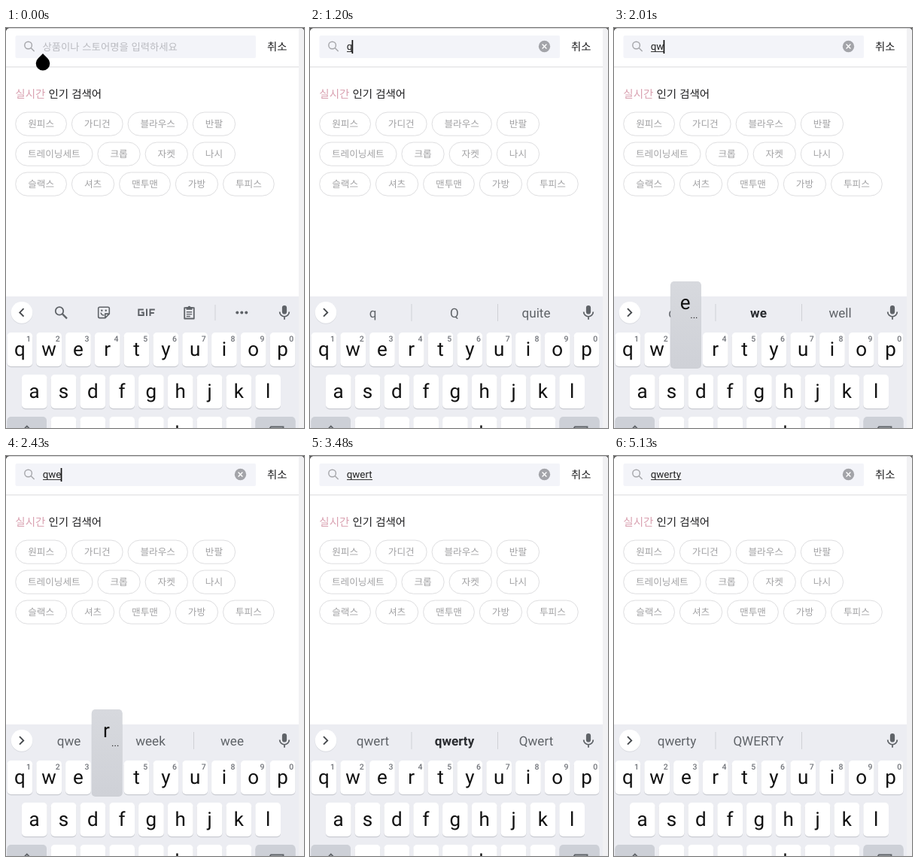
These frames come from a looping animation (396x532 px, 5580 ms). An HTML page:

```html
<!DOCTYPE html>
<html lang="ko">
<head>
<meta charset="utf-8">
<title>Search input</title>
<style>
  html, body { margin: 0; width: 100%; height: 100%; overflow: hidden; background: #fff; }
  svg { display: block; width: 396px; height: 532px; text-rendering: geometricPrecision; }
  text { font-family: Roboto, sans-serif; }
  .ko { font-family: "Noto Sans CJK KR", "Noto Sans CJK", sans-serif; }
  .mid { text-anchor: middle; }
  .key { font-size: 26px; fill: #111; text-anchor: middle; }
  .hint { font-size: 10.5px; font-weight: 500; fill: #707379; text-anchor: middle; }
  .word { font-size: 17.1px; fill: #5f6368; text-anchor: middle; }
  .line { fill: none; stroke: #5f6368; stroke-width: 1.8; }
</style>
</head>
<body>
<svg id="stage" viewBox="0 0 396 532">
  <defs>
    <linearGradient id="popFill" x2="0" y2="1">
      <stop offset="0" stop-color="#d7d9de"/>
      <stop offset="1" stop-color="#cfd1d7"/>
    </linearGradient>
  </defs>
  <rect width="396" height="532" fill="#fff"/>

  <rect x="12.5" y="10" width="319.5" height="30" rx="2" fill="#f3f4f9"/>
  <g fill="none" stroke="#a5a6aa" stroke-width="1.4">
    <circle cx="29.6" cy="23" r="4.8"/>
    <path d="M33.2 26.6l4.4 4.4"/>
  </g>
  <text id="placeholder" class="ko" x="48.5" y="29.5" font-size="13.35" fill="#babbc0">상품이나 스토어명을 입력하세요</text>
  <text id="typed" x="48.7" y="29.3" font-size="13.4" fill="#222"></text>
  <rect id="underline" x="49" y="31" height="1" fill="#333"/>
  <rect id="caret" y="16" width="1.7" height="18" fill="#111"/>
  <g id="clear">
    <circle cx="311.5" cy="24.5" r="7.7" fill="#a3a4a9"/>
    <path d="M308.6 21.6l5.8 5.8m0-5.8l-5.8 5.8" stroke="#fff" stroke-width="1.4"/>
  </g>
  <text class="ko" x="347" y="30" font-size="14.4" fill="#1c1c1e">취소</text>
  <rect y="51" width="389" height="1.5" fill="#e6e6e8"/>
  <path id="handle" d="M49 34l6.5 6.5a9.3 9.3 0 1 1-13 0z"/>

  <text class="ko" x="12.3" y="93" font-size="14.5" fill="#1c1c1e"><tspan fill="#d9a0b0">실시간</tspan> 인기 검색어</text>
  <g id="chips"></g>

  <rect y="357" width="389" height="175" fill="#ecedf2"/>
  <circle cx="21" cy="379.2" r="14.5" fill="#d9dbe0"/>
  <circle cx="21" cy="378.4" r="14.3" fill="#fff"/>
  <path id="chevron" fill="none" stroke="#45484c" stroke-width="1.9"/>

  <g id="tools">
    <g class="line">
      <circle cx="71" cy="376.4" r="5.2"/>
      <path d="M75 380.4l6 6" stroke-width="2.2"/>
      <path d="M124.5 371.3h11q1.8 0 1.8 1.8v7l-5.5 5.5h-7.3q-1.8 0-1.8-1.8v-10.700q0-1.800 1.800-1.800zM131.800 385.300v-5.200h5.300" stroke-width="1.600"/>
      <path d="M126 378.600q1 3.600 4.500 3.300" stroke-width="1.500"/>
      <path d="M182.800 374.500h-6.500v7.400h6.500v-3.500h-3M187 373.500v9.400M191.500 383v-8.500h6.300M191.500 379h5.300" stroke-width="2"/>
      <path d="M237.200 372.200h12.600v14.300h-12.600z" stroke-linejoin="round"/>
      <path d="M239.800 377.700h7.400m-7.400 2.900h7.400m-7.400 2.900h5" stroke-width="1.400"/>
    </g>
    <g fill="#5f6368">
      <path d="M239.500 371h2.200a1.900 1.900 0 0 1 3.600 0h2.200v3.700h-8z"/>
      <circle cx="127.300" cy="375.700" r="1.200"/><circle cx="132.700" cy="375.700" r="1.200"/>
      <circle cx="307.300" cy="378.500" r="2"/><circle cx="313.300" cy="378.500" r="2"/><circle cx="319.300" cy="378.500" r="2"/>
    </g>
    <rect x="277.500" y="368" width="1" height="21" fill="#cfd1d6"/>
  </g>
  <g id="words">
    <path d="M135 367v23M249.500 367v23" stroke="#cfd1d6"/>
    <text class="word" x="83.500" y="385"></text>
    <text class="word" x="192" y="385"></text>
    <text class="word" x="300.500" y="385"></text>
  </g>
  <rect x="366.900" y="369" width="6.200" height="11.500" rx="3.100" fill="#5f6368"/>
  <path class="line" d="M363.700 377.500a6.300 6.300 0 0 0 12.600 0M370 383.800v4"/>

  <g id="keys"></g>
  <path d="M19.500 538l8.300-8.500 8.300 8.500" class="line"/>
  <path d="M345 540l7-9.500h16.500v10" class="line"/>

  <g id="popup">
    <rect x="-.5" y="337.500" width="41" height="115.500" rx="5" fill="#b9bcc3" opacity=".6"/>
    <rect y="337" width="40" height="115" rx="4.500" fill="url(#popFill)"/>
    <text class="key" x="19.300" y="374"></text>
    <text x="31" y="386" class="mid" font-size="13" fill="#222">...</text>
  </g>

  <rect x="389" width="7" height="532" fill="#f1f1f3"/>
  <rect width="396" height="1" fill="#d2d2d4"/>
  <path d="M0 0h4q-3 1-4 4zM396 0h-3q2 .5 3 3z" fill="#555"/>
</svg>
<script>
const LOOP = 5580, PITCH = 38.8;
const $ = id => document.getElementById(id);
const show = (el, on) => el.setAttribute('visibility', on ? 'visible' : 'hidden');

const chipRows = ['원피스 가디건 블라우스 반팔', '트레이닝세트 크롭 자켓 나시', '슬랙스 셔츠 맨투맨 가방 투피스'];
$('chips').innerHTML = chipRows.map((row, r) => {
  let x = 12.7;
  const y = 112 + r * 40;
  return row.split(' ').map(label => {
    const w = 33.3 + 11.5 * label.length;
    const chip = `<rect x="${x}" y="${y}" width="${w}" height="31.2" rx="15.6" fill="#fff" stroke="#dedee0"/>
      <text class="ko mid" x="${x + w / 2}" y="${y + 20.2}" font-size="12.65" fill="#a2a2a4">${label}</text>`;
    x += w + 6.9;
    return chip;
  }).join('');
}).join('');

function keyShape(x, y, w, fill) {
  return `<rect x="${x}" y="${y + 1.2}" width="${w}" height="45" rx="5" fill="#c9cbd1"/>
    <rect x="${x}" y="${y}" width="${w}" height="45" rx="5" fill="${fill}"/>`;
}
const keyRows = [['qwertyuiop', 1.5, 405], ['asdfghjkl', 20.9, 461], ['zxcvbnm', 59.7, 517]];
$('keys').innerHTML = keyRows.map(([letters, left, y]) => [...letters].map((c, i) => {
  const x = left + i * PITCH;
  const hint = y === 405 ? `<text class="hint" x="${x + 28.5}" y="${y + 11.5}">${(i + 1) % 10}</text>` : '';
  return keyShape(x, y, 33.7, '#fff') + `<text class="key" x="${x + 16.8}" y="${y + 30.5}">${c}</text>` + hint;
}).join('')).join('') + keyShape(1.5, 517, 52.5, '#cdd0d7') + keyShape(331.5, 517, 53, '#cdd0d7');

// Each letter: key down, key up, text entered, suggestions refreshed.
const presses = [
  ['q', 1080, 1170, 1170, 1200, ['q', 'Q', 'quite']],
  ['w', 1500, 1560, 1560, 1590, ['qw', '*we', 'well']],
  ['e', 2010, 2100, 2100, 2130, ['qwe', 'week', 'wee']],
  ['r', 2430, 2550, 2550, 2580, ['qwer', "we're", 'qwerty']],
  ['t', 2910, 3000, 3030, 3060, ['qwert', '*qwerty', 'Qwert']],
  ['y', 3690, 3780, 3780, 3810, ['qwerty', 'QWERTY', '']]
];
const caretOff = [[0, 330], [780, 1170], [3480, 3780], [4230, 4680], [5130, LOOP]];

const popupText = $('popup').querySelector('text');
const wordEls = $('words').querySelectorAll('text');

function draw(t) {
  let text = '', words = null, pressed = -1;
  presses.forEach(([letter, down, up, enter, refresh, list], i) => {
    if (t >= enter) text += letter;
    if (t >= refresh) words = list;
    if (t >= down && t < up) pressed = i;
  });

  $('typed').textContent = text;
  const width = text ? $('typed').getComputedTextLength() : 0;
  $('underline').setAttribute('width', width);
  $('caret').setAttribute('x', 48.5 + width - (text ? .6 : 0));
  show($('caret'), !caretOff.some(([from, to]) => t >= from && t < to));
  show($('placeholder'), !text);
  show($('clear'), text);
  $('handle').setAttribute('opacity', Math.max(0, Math.min(1, (450 - t) / 210)));

  show($('tools'), !words);
  show($('words'), words);
  $('chevron').setAttribute('d', words ? 'M18 373.2l5.200 5.200-5.200 5.200' : 'M23.500 373.200l-5.200 5.200 5.200 5.200');
  if (words) words.forEach((word, i) => {
    const bold = word[0] === '*';
    wordEls[i].textContent = bold ? word.slice(1) : word;
    wordEls[i].style.fontWeight = bold ? 700 : 400;
    wordEls[i].style.fill = bold ? '#2a2c30' : '#5f6368';
  });

  show($('popup'), pressed >= 0);
  if (pressed >= 0) {
    popupText.textContent = presses[pressed][0];
    $('popup').setAttribute('transform', `translate(${Math.max(0, pressed * PITCH - 2.2)})`);
  }
}

const start = performance.now();
function tick() {
  draw((performance.now() - start) % LOOP);
  requestAnimationFrame(tick);
}
tick();
</script>
</body>
</html>
```
